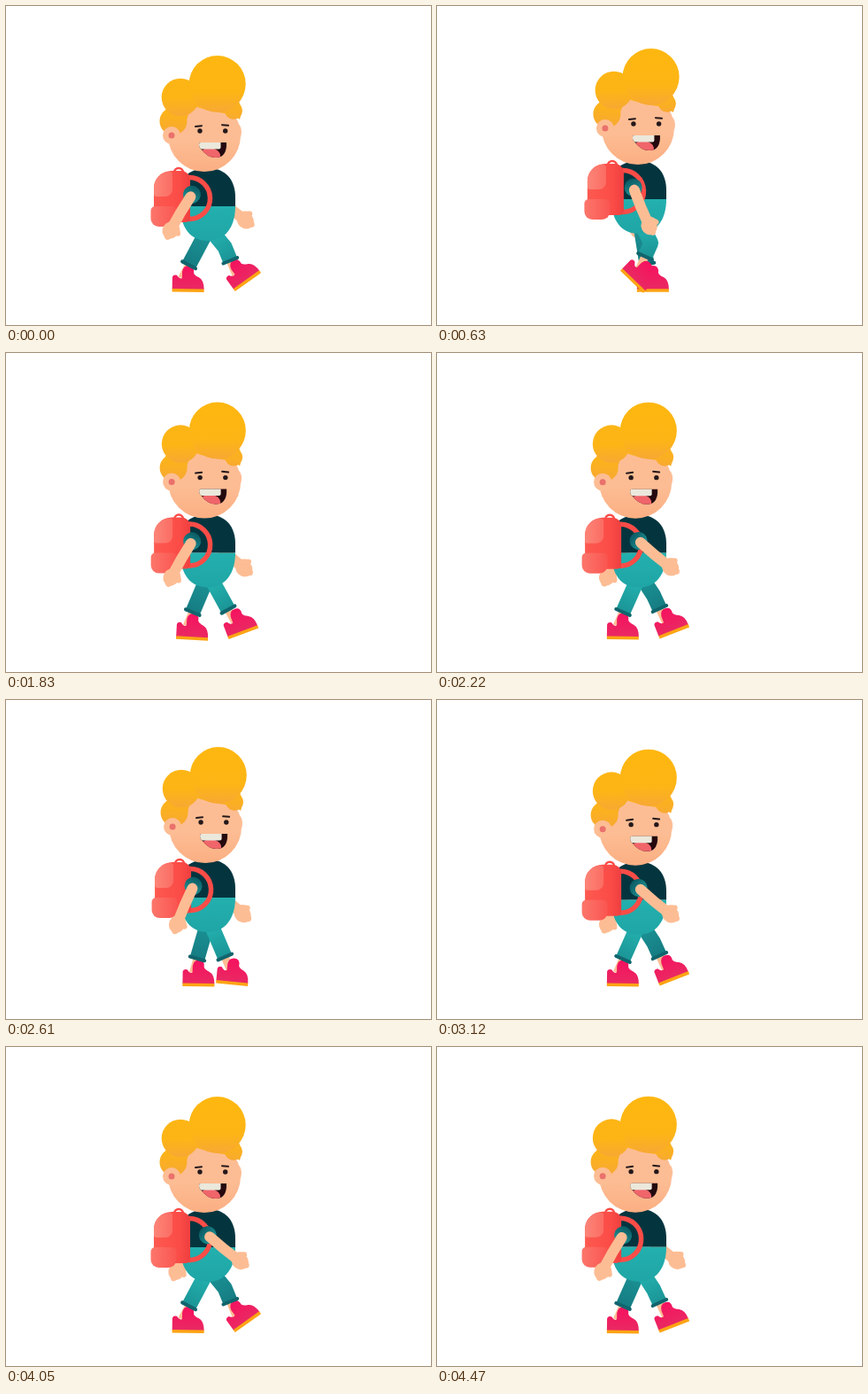
Recreate the animation shown at these times as an HTML page with a canvas. Size 480 by 360 pixels, loop 4500 ms.

```html
<!DOCTYPE html>
<html lang="en">
<head>
<meta charset="utf-8">
<title>Walking boy</title>
<style>
  html, body { margin: 0; width: 100%; height: 100%; overflow: hidden; background: #fff; }
  canvas { display: block; width: 480px; height: 360px; }
</style>
</head>
<body>
<canvas id="stage" width="480" height="360"></canvas>
<script>
const c = document.getElementById('stage').getContext('2d');
const LOOP = 4500, CYCLE = 900, HALF = CYCLE / 2;
const SKIN = '#fdbd94', TEAL = '#22adab', NAVY = '#04353f', RED = '#fb4c47';

// Step of one foot: time, sole centre x, y, tilt in degrees
const STEP = [
  [0, 272.5, 310, -36], [30, 268, 315, -21], [75, 259, 321, 0],
  [180, 244, 321, 0], [270, 233, 321, 0], [360, 217.5, 321.5, 1],
  [420, 210, 321.5, 1], [450, 205.5, 321, 1], [480, 210, 322, 3],
  [540, 214, 318, 21], [630, 221, 310, 44], [720, 236, 312, 25],
  [810, 255, 319.5, 6], [870, 267.5, 314.5, -21], [900, 272.5, 310, -36]
];

const SHOE = new Path2D('M-18-1V-15Q-17-18-13-17Q-10-12-7-14V-21Q-6-28 0-28Q7-28 6-20Q7-17 12-15Q18-12 18-1Z');
const BODY = new Path2D('M197 226V212C197 192 208 183 228 183C248 183 259 196 259 216V226C259 250 247 265 228 265C208 265 197 250 197 226Z');
const HAIR = new Path2D('M176 128Q184 100 212 92L262 105Q268 118 264 128Q257 122 246 121Q226 118 213 113Q204 121 202 138Q192 142 178 138Z');
const MOUTH = new Path2D('M218 156Q218 154 220 154H249V158Q248 171 237 171Q227 171 220 161Q218 160 218 156Z');

const cos = t => Math.cos(t / CYCLE * 2 * Math.PI);

function fill(color, path) { c.fillStyle = color; c.fill(path); }

function oval(color, x, y, rx, ry = rx) {
  c.fillStyle = color;
  c.beginPath();
  c.ellipse(x, y, rx, ry, 0, 0, 7);
  c.fill();
}

function box(color, x, y, w, h, r) {
  c.fillStyle = color;
  c.beginPath();
  c.roundRect(x, y, w, h, r);
  c.fill();
}

function line(color, width, points, cap = 'butt') {
  c.strokeStyle = color;
  c.lineWidth = width;
  c.lineCap = cap;
  c.lineJoin = 'round';
  c.beginPath();
  points.forEach(p => c.lineTo(p[0], p[1]));
  c.stroke();
}

function fade(x0, y0, x1, y1, ...stops) {
  const g = c.createLinearGradient(x0, y0, x1, y1);
  stops.forEach(([at, color]) => g.addColorStop(at, color));
  return g;
}

function group(x, y, angle, draw) {
  c.save();
  c.translate(x, y);
  c.rotate(angle);
  draw();
  c.restore();
}

function footAt(t) {
  t %= CYCLE;
  const i = STEP.findIndex(s => s[0] > t);
  const a = STEP[i - 1], b = STEP[i], k = (t - a[0]) / (b[0] - a[0]);
  return [1, 2, 3].map(n => a[n] + (b[n] - a[n]) * k);
}

function leg(t, rise, top, low) {
  const [fx, fy, deg] = footAt(t);
  const tilt = deg * Math.PI / 180, s = Math.sin(tilt), k = Math.cos(tilt);
  const hip = [229, 250 + rise];
  const ankle = [fx - 5 * k + 18 * s, fy - 5 * s - 18 * k];
  const dx = ankle[0] - hip[0], dy = ankle[1] - hip[1], d = Math.hypot(dx, dy);
  const bend = Math.sqrt(Math.max(0, 28.5 ** 2 - d * d / 4));
  const knee = [hip[0] + dx / 2 + dy / d * bend, hip[1] + dy / 2 - dx / d * bend];
  const sx = ankle[0] - knee[0], sy = ankle[1] - knee[1], n = Math.hypot(sx, sy);
  const ux = sx / n, uy = sy / n;
  const cuff = [ankle[0] - ux * 12, ankle[1] - uy * 12];

  line(SKIN, 9, [cuff, [ankle[0] + ux * 5, ankle[1] + uy * 5]]);
  group(fx, fy, tilt, () => {
    fill(fade(0, -27, 0, 0, [0, '#f5125f'], [1, '#e92a63']), SHOE);
    line('#fca414', 3.5, [[-18, 0], [18, 0]]);
  });
  line(fade(...hip, ...cuff, [0.3, top], [1, low]), 17, [hip, knee, cuff]);
  line('#11656d', 4, [[cuff[0] - uy * 8.5, cuff[1] + ux * 8.5], [cuff[0] + uy * 8.5, cuff[1] - ux * 8.5]], 'round');
}

function arm(t, x, rise) {
  const swing = cos(t);
  group(x - 7.6 * swing, 211 + rise, -(10 - 41 * swing) * Math.PI / 180, () => {
    oval(fade(0, -8, 0, 8, [0, '#0b5a63'], [1, '#1b8a8c']), 0, 2, 10);
    c.strokeStyle = SKIN;
    c.lineWidth = 12;
    c.lineCap = 'round';
    c.beginPath();
    c.moveTo(0, 5);
    c.quadraticCurveTo(-1, 26, 0, 45);
    c.stroke();
    oval(SKIN, 0, 49, 9, 10);
    line(SKIN, 6, [[5, 43], [9, 48]], 'round');
    line(SKIN, 7, [[-2, 54], [1, 57]], 'round');
  });
}

function torso() {
  c.save();
  c.clip(BODY);
  c.fillStyle = NAVY;
  c.fillRect(190, 180, 75, 46);
  c.fillStyle = fade(0, 226, 0, 266, [0, '#23b0ae'], [1, '#1fa5a5']);
  c.fillRect(190, 226, 75, 42);
  c.restore();
}

function bag() {
  c.strokeStyle = RED;
  c.lineWidth = 5.5;
  c.beginPath();
  c.arc(207, 217, 23.5, -1.6, 1.6);
  c.stroke();
  c.lineWidth = 2.5;
  c.beginPath();
  c.arc(195, 188, 5, Math.PI, 0);
  c.stroke();
  box(fade(166, 0, 208, 0, [0, '#fd5a50'], [0.7, RED], [1, '#ee3f40']), 167, 186, 41, 58, [20, 10, 5, 8]);
  box(fade(167, 0, 189, 0, [0, '#fc8578'], [1, '#fb6b62']), 167, 187, 21, 28, [18, 3, 8, 3]);
  box(fade(163, 0, 193, 0, [0, '#fc776c'], [1, '#fa5550']), 163.5, 226, 29, 23, [5, 5, 9, 9]);
}

function head(blink) {
  oval(SKIN, 260, 142, 6, 10);
  oval(fade(0, 150, 0, 188, [0, SKIN], [1, '#fbae82']), 224, 146, 41);

  const gold = '#fdb515', low = '#f7a834';
  oval(fade(0, 108, 0, 130, [0, gold], [1, low]), 257, 118, 10);
  fill(fade(0, 100, 0, 140, [0, gold], [1, low]), HAIR);
  oval(fade(0, 115, 0, 146, [0, gold], [1, low]), 189, 130, 15.5);
  oval(fade(0, 82, 0, 125, [0, gold], [0.5, gold], [1, low]), 197, 103, 21.3);
  oval(fade(0, 57, 0, 120, [0, '#feb70f'], [0.65, gold], [1, low]), 238.7, 88, 32);
  oval(SKIN, 187, 146, 10);
  oval('#ea716c', 187, 146, 3.5);

  const ink = '#24181b', drop = blink ? 1.5 : 0;
  line(ink, 2, [[214, 136 + drop], [221, 135.2 + drop]], 'round');
  line(ink, 2, [[244, 134.2 + drop], [251, 134.8 + drop]], 'round');
  for (const x of [219, 247.7]) {
    if (blink) line(ink, 2, [[x - 2, 141], [x + 2, 141]], 'round');
    else oval(ink, x, 141, 2.7);
  }

  c.save();
  c.clip(MOUTH);
  c.fillStyle = '#24090f';
  c.fillRect(215, 150, 40, 25);
  oval('#f0656a', 230, 169, 12, 9);
  box('#ebe8dc', 215, 152, 27.5, 9.5, [0, 0, 2, 0]);
  c.restore();
}

function draw(now) {
  const t = now % LOOP, p = t % CYCLE;
  const lift = 1 - cos(2 * p);
  const rise = -4.4 * lift, shift = 1.6 * lift;

  c.clearRect(0, 0, 480, 360);
  arm(p + HALF + 20, 225, rise);
  leg(p + HALF, rise, '#1a8f92', '#157c82');
  leg(p, rise, TEAL, '#1b9496');
  group(0, rise, 0, torso);
  group(shift, rise, 0, bag);
  arm(p, 218.6, rise);
  group(shift, rise, 0, () => head(t >= 1095 && t < 1245));
}

const start = performance.now();
function tick() {
  draw(performance.now() - start);
  requestAnimationFrame(tick);
}
tick();
</script>
</body>
</html>
```
